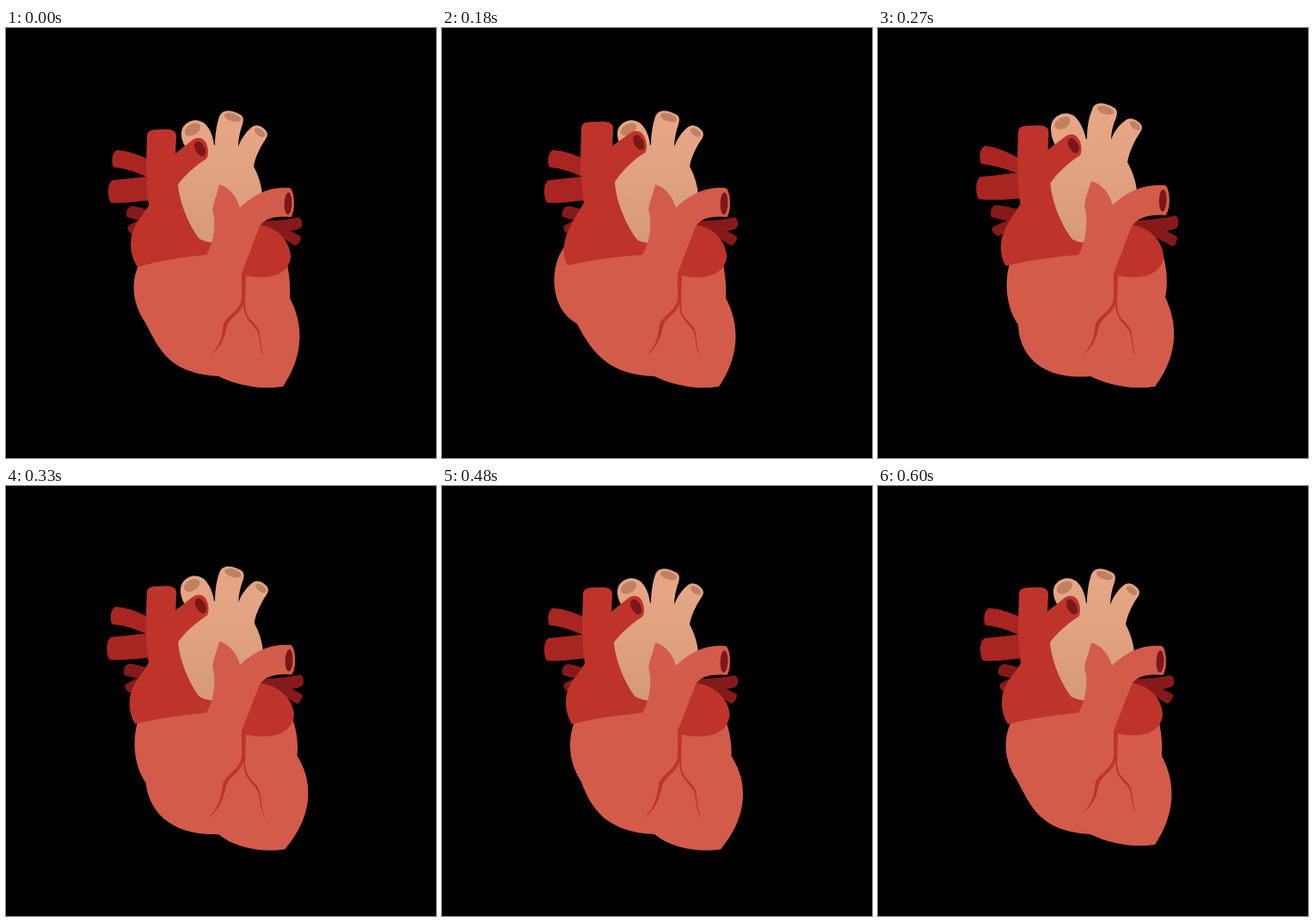
Write an HTML page that moves like this. It is 500 px wide and 500 px high and loops after 1.23 s.

```html
<!DOCTYPE html>
<html lang="en">
<head>
<meta charset="utf-8">
<title>Beating heart</title>
<style>
  html, body { margin: 0; width: 100%; height: 100%; overflow: hidden; background: #000; }
  svg { display: block; width: 100vw; height: 100vh; }
</style>
</head>
<body>
<svg id="stage" viewBox="0 0 500 500">
  <defs>
    <linearGradient id="aorta" gradientUnits="userSpaceOnUse" x1="0" y1="120" x2="0" y2="250">
      <stop offset="0" stop-color="#e6a685"/>
      <stop offset="1" stop-color="#d69a79"/>
    </linearGradient>
  </defs>
</svg>
<script>
const LOOP = 1230, STEP = 30;
const FLESH = '#d35b4a', RED = '#be342b', DEEP = '#a92521', DARK = '#861a1a',
      HOLE = '#7a1718', TAN_HOLE = '#c08062';

// Each pose list is [time, shape] pairs; shapes blend linearly in between.
const still = a => [[0, a]];
const swell = (a, b) => [[180, a], [270, b], [360, a]];
const squeeze = (a, b, c) => [[0, a], [120, b], [180, b], [360, c]];

const parts = [];
const path = (fill, poses) => parts.push({ tag: 'path', attr: 'd', fill, poses });
const oval = (fill, rx, ry, poses) =>
  parts.push({ tag: 'ellipse', attr: 'transform', fill, rx, ry, poses });

// Side vessels
path(DARK, swell(
  'M170,214 C160,210 152,207 146,207 C140,209 138,216 141,220 C148,222 156,224 168,225Z',
  'M170,212 C158,210 146,206 136,206 C131,208 130,216 132,220 C142,223 156,225 168,226Z'));
path(DARK, swell(
  'M166,218 C156,222 147,227 142,230 C140,233 143,238 147,240 C154,236 160,232 170,228Z',
  'M166,217 C154,222 140,228 133,232 C131,235 135,240 139,242 C150,238 158,232 170,228Z'));
path(DEEP, swell(
  'M170,155 C155,147 143,143 129,142 C123,144 122,156 125,162 C140,163 152,168 168,175Z',
  'M170,155 C153,145 140,139 125,137 C118,139 117,151 120,158 C136,160 148,163 168,172Z'));
path(DEEP, swell(
  'M170,172 C155,174 140,175 124,177 C117,181 118,197 122,203 C138,205 155,201 170,200Z',
  'M170,168 C150,169 135,172 119,173 C113,177 113,193 117,199 C135,201 155,199 170,198Z'));
path(DARK, swell(
  'M290,225 C312,224 328,223 340,220 C345,222 345,229 343,232 C340,235 336,235 331,236 C336,239 340,240 343,243 C343,247 340,252 336,253 C324,246 312,237 292,234Z',
  'M290,225 C312,223 330,222 346,218 C350,220 350,228 348,232 C344,234 340,235 336,236 C340,239 344,240 348,243 C348,247 346,252 343,254 C328,246 312,237 292,234Z'));

// Aortic arch
path('url(#aorta)', swell(
  'M210,140 C204,132 202,122 206,115 C213,106 223,105 231,111 C238,118 241,127 242,136 L243,136 C243,124 245,112 248,103 C252,94 262,95 273,101 C277,104 276,108 275,112 C272,120 270,130 270,138 C273,130 278,122 285,116 C290,111 297,113 302,119 C305,123 304,126 302,129 C296,138 290,149 288,161 C294,172 297,183 298,194 L275,225 L250,255 L225,250 L195,200Z',
  'M208,140 C201,128 199,116 203,108 C210,98 221,97 229,103 C236,110 240,120 242,129 L243,129 C243,115 245,104 249,95 C252,85 263,86 275,93 C279,96 278,100 277,104 C273,113 271,122 271,130 C274,121 280,113 287,108 C292,103 299,105 305,111 C308,115 307,118 305,121 C298,131 292,145 290,156 C296,167 300,178 301,190 L275,225 L250,255 L225,250 L195,200Z'));
oval(TAN_HOLE, 10, 6.3, swell('translate(217 118) rotate(-30)', 'translate(214.5 110.5) rotate(-30)'));
oval(TAN_HOLE, 10, 4.6, swell('translate(263.5 104) rotate(18)', 'translate(264.5 95.5) rotate(18)'));
oval(TAN_HOLE, 7.2, 3.7, swell('translate(295 121.5) rotate(38)', 'translate(299 113.5) rotate(38)'));

// Ventricles
path(FLESH, [
  [120, 'M158,268 C144,292 146,318 161,341 C178,372 187,401 247,405 L300,380 L300,270 L200,255Z'],
  [180, 'M142,255 C126,275 123,325 157,344 C176,380 195,403 247,405 L300,380 L300,270 L200,255Z'],
  [270, 'M156,264 C145,293 149,325 163,345 C164,380 190,410 247,405 L300,380 L300,270 L200,255Z'],
  [390, 'M156,266 C146,292 147,322 162,345 C168,377 194,404 247,405 L300,380 L300,270 L200,255Z'],
  [570, 'M158,268 C144,292 146,318 161,341 C178,372 187,401 247,405 L300,380 L300,270 L200,255Z']
]);
const rightRest = 'M247,405 C270,416 297,421 322,417 C347,380 346,344 330,314 C331,298 329,284 326,270 L240,270Z';
path(FLESH, [
  [210, rightRest],
  [270, 'M247,405 C270,416 297,421 322,417 C352,377 347,340 334,313 C337,300 337,280 330,260 L240,270Z'],
  [390, 'M247,405 C262,425 295,432 326,428 C365,388 367,346 343,314 C343,302 340,285 333,274 L240,270Z'],
  [570, rightRest]
]);

// Atria
path(RED, squeeze(
  'M164,127 C164,118 170,118 181,118 C192,117 198,119 198,126 L197,146 L217,130 C222,127 227,127 231,131 C236,137 236,149 233,152 C220,160 206,173 200,182 C202,208 218,238 225,245 Q232,249 243,250 L243,263 Q190,267 153,278 C145,266 143,252 147,238 C151,225 160,217 166,206 C162,180 163,152 164,127Z',
  'M162,118 C162,109 168,109 180,109 C193,108 199,110 199,117 L198,137 L219,122 C224,119 229,119 233,123 C239,130 239,142 236,145 C222,153 207,169 201,179 C202,206 220,239 228,247 Q234,250 243,250 L243,263 Q190,266 146,276 C140,268 140,251 146,238 C151,225 159,214 165,203 C160,174 161,146 162,118Z',
  'M164,127 C164,118 170,118 181,118 C192,117 198,119 198,126 L197,146 L217,130 C222,127 227,127 231,131 C236,137 236,149 233,152 C220,160 206,173 200,182 C202,208 218,238 225,245 Q232,249 243,250 L243,263 Q190,267 151,277 C144,265 142,251 146,238 C151,225 160,217 166,206 C162,180 163,152 164,127Z'));
const holeRest = 'translate(225.7 140.5) rotate(-28)';
oval(HOLE, 5.5, 9.5, squeeze(holeRest, 'translate(228.8 133) rotate(-28)', holeRest));
const lobe = 'M293,229 C318,231 330,250 331,265 C330,285 310,294 279,288 L272,285 L280,240Z';
path(RED, [
  [240, lobe],
  [270, 'M293,229 C318,231 331,250 332,265 C331,285 310,294 279,288 L272,285 L280,240Z'],
  [390, 'M293,229 C320,231 337,250 338,266 C337,288 312,298 279,290 L272,285 L280,240Z'],
  [570, lobe]
]);

// Pulmonary artery
path(FLESH, swell(
  'M248,182 C261,186 268,196 272,209 C287,195 304,184 330,186 C336,190 337,214 331,220 C312,218 298,222 294,233 L274,285 L272,305 L222,305 L233,264 C242,248 245,226 240,211 C242,200 246,192 248,182Z',
  'M248,178 C261,182 269,192 273,206 C288,192 306,181 334,183 C340,187 341,211 334,218 C314,216 299,222 294,233 L274,285 L272,305 L222,305 L233,264 C242,248 245,224 240,208 C241,197 245,188 248,178Z'));
oval(HOLE, 4.4, 12.8, swell('translate(328 204) rotate(2)', 'translate(331.2 200.5) rotate(2)'));

// Surface vein
const vein = 'M274,284 L279,287 L278,318 C277,333 283,338 291,346 C298,354 294,368 300,381 C293,372 297,358 290,349 C283,341 276,336 276,320 C274,331 262,336 258,344 C254,354 256,366 238,381 C253,364 251,354 253,344 C258,333 275,327 274,312Z';
path(RED, [
  [270, vein],
  [390, 'M274,284 L279,289 L278,318 C277,334 283,341 291,349 C300,359 295,377 303,391 C294,380 298,361 290,352 C283,343 276,338 276,320 C274,332 261,337 257,346 C252,357 253,374 233,392 C250,372 249,357 252,346 C257,334 275,328 274,312Z'],
  [570, vein]
]);

const stage = document.getElementById('stage');
for (const p of parts) {
  p.el = document.createElementNS('http://www.w3.org/2000/svg', p.tag);
  for (const key of ['fill', 'rx', 'ry']) if (p[key]) p.el.setAttribute(key, p[key]);
  stage.append(p.el);
}

function mix(a, b, k) {
  const goal = b.match(/-?\d+(\.\d+)?/g);
  let i = 0;
  return a.replace(/-?\d+(\.\d+)?/g, n => (+n + (goal[i++] - n) * k).toFixed(2));
}

function poseAt(poses, t) {
  const next = poses.findIndex(p => p[0] > t);
  if (next === 0) return poses[0][1];
  if (next < 0) return poses[poses.length - 1][1];
  const [t0, a] = poses[next - 1], [t1, b] = poses[next];
  return mix(a, b, (t - t0) / (t1 - t0));
}

function draw(t) {
  for (const p of parts) p.el.setAttribute(p.attr, poseAt(p.poses, t));
}

const start = performance.now();
function tick() {
  const t = (performance.now() - start) % LOOP;
  draw(Math.floor(t / STEP) * STEP);
  requestAnimationFrame(tick);
}
tick();
</script>
</body>
</html>
```
